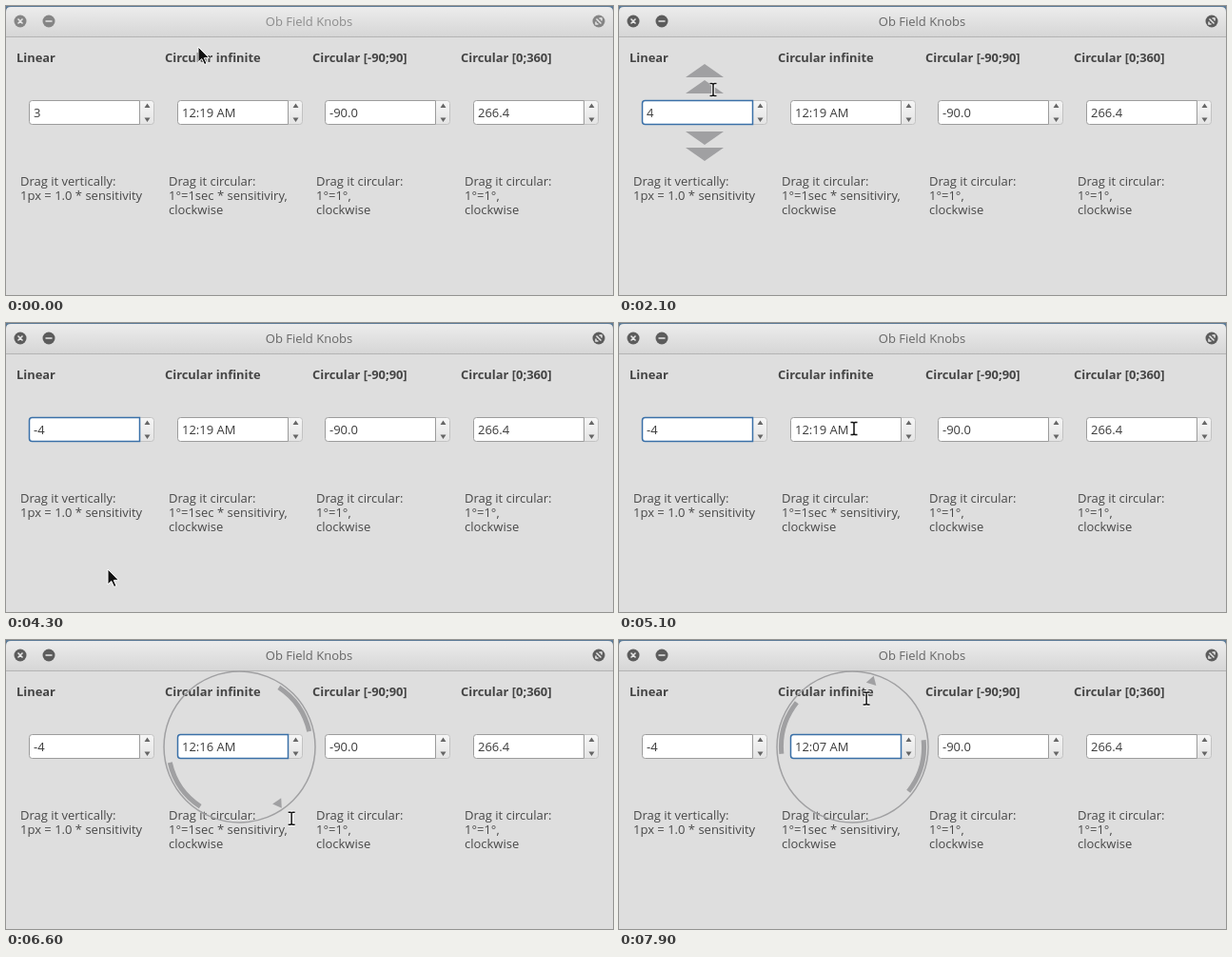
These frames come from a looping animation (638 px wide and 304 px high, 8 s). An HTML page:

```html
<!DOCTYPE html>
<html lang="en">
<head>
<meta charset="utf-8">
<style>
  html, body { margin: 0; width: 100%; height: 100%; overflow: hidden; background: #dedede; }
  svg { display: block; width: 638px; height: 304px; }
  text { font: 13px "Open Sans", "Noto Sans", sans-serif; fill: #3c3c3c; white-space: pre; }
  .heading { font-weight: 700; font-size: 12.9px; fill: #444; }
  .note { fill: #484848; }
  #titlebar { --ink: #8c8c8c; --button: #858585; }
  #titlebar.active { --ink: #666; --button: #5c5c5c; }
  #titlebar text { fill: var(--ink); text-anchor: middle; }
  #titlebar circle { fill: var(--button); }
  #titlebar path { stroke: #e6e6e6; stroke-width: 1.5; fill: none; }
  .edit { fill: #fff; stroke: #9c9c9c; }
  .edit.focus { stroke: #3a70a8; stroke-width: 1.5; }
  .hint { fill: #a0a0a2; }
  .ring { fill: none; stroke: #a0a0a2; }
</style>
</head>
<body>
<svg viewBox="0 0 638 304">
  <defs>
    <linearGradient id="bar" x2="0" y2="1">
      <stop stop-color="#ececec"/><stop offset="1" stop-color="#d6d6d6"/>
    </linearGradient>
    <linearGradient id="spin" x2="0" y2="1">
      <stop stop-color="#f6f6f6"/><stop offset="1" stop-color="#e4e4e4"/>
    </linearGradient>
  </defs>
  <rect width="638" height="304" fill="#dedede"/>
  <rect width="638" height="8" fill="#5d7c98"/>
  <path d="M0 32V6Q0 1 5 1H633Q638 1 638 6V32Z" fill="url(#bar)"/>
  <path d="M0 32.5H638" stroke="#b4b4b4"/>
  <g id="titlebar">
    <text x="318.5" y="21">Ob Field Knobs</text>
    <circle cx="15" cy="16" r="6.5"/><circle cx="45" cy="16" r="6.5"/><circle cx="623" cy="16" r="6.5"/>
    <path d="M12.5 13.5l5 5m0 -5l-5 5M41.5 16h7M620.5 13.5l5 5M620 16.5v2.5h2.5M623.5 13h2.5v2.5"/>
  </g>
  <g id="columns"></g>
  <path id="caret" d="M41.5 104V120" stroke="#222"/>
  <path id="arrows" class="hint" d="M70 75h40l-20 -14zM70 92h40l-20 -14zM70 132h40l-20 14zM70 149h40l-20 14z"/>
  <g id="dial" transform="translate(245.5 112.5)">
    <circle class="ring" r="79.5" stroke-width="1.5"/>
    <g id="rotor">
      <path id="arcs" class="ring" stroke-width="5"/>
      <path id="pointer" class="hint" d="M0 -78L-5.5 -69H5.5Z"/>
    </g>
  </g>
  <g id="cursor">
    <path id="pointerShape" d="M0 0V16L3.8 12.6L6.6 18.6L9 17.5L6.3 11.7H11.5Z" fill="#111" stroke="#fff"/>
    <g id="beam" fill="none">
      <path d="M-3.5 -6.5H-1L0 -5.5L1 -6.5H3.5M0 -6V6M-3.5 6.5H-1L0 5.5L1 6.5H3.5" stroke="#fff" stroke-width="3.5"/>
      <path d="M-3.5 -6.5H-1L0 -5.5L1 -6.5H3.5M0 -6V6M-3.5 6.5H-1L0 5.5L1 6.5H3.5" stroke="#111" stroke-width="1.5"/>
    </g>
  </g>
</svg>
<script>
const LOOP = 8000, STEP = 100;
const CENTER = { x: 245.5, y: 112.5 };
const $ = id => document.getElementById(id);
const show = (id, on) => { $(id).style.display = on ? '' : 'none'; };

const columns = [
  [11, 'Linear', '3', ['Drag it vertically:', '1px = 1.0 * sensitivity']],
  [167, 'Circular infinite', '12:19 AM', ['Drag it circular:', '1°=1sec * sensitiviry,', 'clockwise']],
  [322, 'Circular [-90;90]', '-90.0', ['Drag it circular:', '1°=1°,', 'clockwise']],
  [478, 'Circular [0;360]', '266.4', ['Drag it circular:', '1°=1°,', 'clockwise']],
];

$('columns').innerHTML = columns.map(([x, heading, value, notes]) => `
  <g transform="translate(${x} 0)">
    <text class="heading" y="59">${heading}</text>
    <rect x="100.5" y="99.5" width="44" height="25" rx="3" fill="url(#spin)" stroke="#c2c2c2"/>
    <path d="M134.500 107h6l-3 -4.500zM134.500 117.500h6l-3 4.500z" fill="#666"/>
    <path class="edit" d="M129.500 99.500H16.500Q13.500 99.500 13.500 102.500V121.500Q13.500 124.500 16.500 124.500H129.500Z"/>
    <text class="value" x="18" y="117">${value}</text>
    ${notes.map((line, i) => `<text class="note" x="4" y="${189 + 15 * i}">${line}</text>`).join('')}
  </g>`).join('');
const values = document.querySelectorAll('.value');
const edits = document.querySelectorAll('.edit');

// Angles run counterclockwise from the top, in degrees.
function polar(angle, radius) {
  const a = angle * Math.PI / 180;
  return [-radius * Math.sin(a), -radius * Math.cos(a)];
}
const arc = middle => `M${polar(middle - 22, 75)}A75 75 0 0 0 ${polar(middle + 22, 75)}`;
$('arcs').setAttribute('d', arc(90) + arc(270));

// Linear interpolation between rows of [time, ...numbers].
function track(keys, t) {
  const next = keys.findIndex(key => key[0] > t);
  if (next === 0) return keys[0].slice(1);
  if (next < 0) return keys[keys.length - 1].slice(1);
  const a = keys[next - 1], b = keys[next];
  const k = (t - a[0]) / (b[0] - a[0]);
  return a.slice(1).map((v, i) => v + (b[i + 1] - v) * k);
}

// time, x, y
const path = [
  [300, 202, 43], [1000, 99, 113], [1800, 99, 113], [2100, 99, 88], [2400, 104, 33],
  [2500, 104, 33], [2600, 105, 31], [2900, 105, 31], [3100, 110, 8], [3400, 102.5, 68],
  [3800, 107, 163], [4100, 107, 259], [4300, 107, 259], [4700, 186, 169], [5100, 247, 111],
];
// time, cursor angle, cursor radius, dial angle
const spiral = [
  [5600, -45, 2.1, 34], [6000, 33, 65, 34], [6200, 95, 88, 97], [6500, 180, 95, 181],
  [6750, 270, 90, 265], [7000, 365, 66, 360], [7200, 441, 50, 435], [7900, 704, 53, 703.5],
];
// time, number in the first field
const counter = [
  [1900, 3], [2000, 4], [2200, 4], [2400, 7], [2500, 7], [2600, 9], [2700, 9],
  [2800, 10], [2900, 10], [3100, 12], [3400, 5], [3800, -2], [4000, -4],
];

function render(t) {
  const [angle, radius, dial] = track(spiral, t);
  let [x, y] = track(path, t);
  if (t > 5600) {
    const [dx, dy] = polar(angle, radius);
    x = CENTER.x + dx;
    y = CENTER.y + dy;
  }
  const linearDrag = t >= 1500 && t < 4200;
  const circularDrag = t >= 5300;
  const overField = y > 99 && y < 126 && (x < 141 || x > 180);

  $('titlebar').classList.toggle('active', t >= 1400);
  edits[0].classList.toggle('focus', t >= 1400 && t < 5300);
  edits[1].classList.toggle('focus', circularDrag);
  values[0].textContent = Math.round(track(counter, t)[0]);
  values[1].textContent = `12:${String(Math.floor((1178 - dial) / 60)).padStart(2, '0')} AM`;

  show('caret', t >= 4500 && t < 5000);
  show('arrows', linearDrag);
  show('dial', circularDrag);
  show('pointer', t > 6000);
  $('rotor').setAttribute('transform', `rotate(${-dial})`);

  const beam = linearDrag || circularDrag || overField;
  show('beam', beam);
  show('pointerShape', !beam);
  $('cursor').setAttribute('transform', `translate(${x} ${y})`);
}

function tick() {
  const t = performance.now() % LOOP;
  render(Math.floor(t / STEP) * STEP);
  requestAnimationFrame(tick);
}
tick();
</script>
</body>
</html>
```
